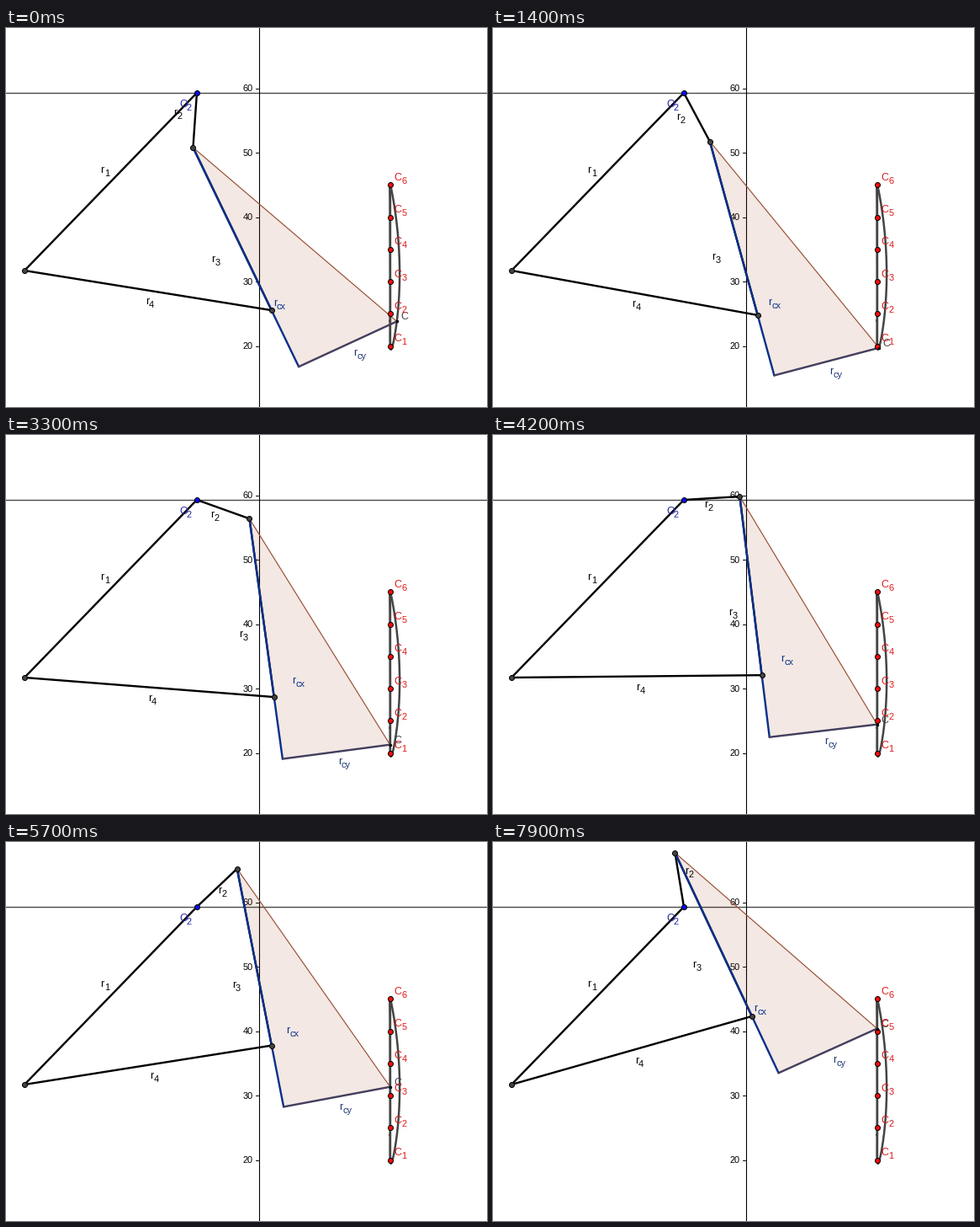
Write a matplotlib script that moves like this. It is 572 px wide and 450 px high and loops after 8 s.

```python
import numpy as np
import matplotlib.pyplot as plt
from matplotlib.animation import FuncAnimation

W, H, DPI = 572, 450, 72          # at 72 dpi one point is one pixel
FRAMES, STEP = 80, 100
SX, SY = 7.83, 7.65               # pixels per unit
NAVY, DARK, RED = "#08308c", "#444444", "#e01818"

# linkage in graph units, points as complex numbers
O2, O4 = -9.39 + 59.28j, -35.57 + 31.70j
R2, R3, R4, RCX, RCY = 8.5, 27.93, 38.02, 37.62, 16.47

# crank angle in degrees against time in ms
TIMES = [0, 1400, 3300, 4200, 5700, 6700, 7900]
ANGLES = [-93.9, -62.4, -20.1, 3.5, 44.1, 68.0, 99.1]

plt.rcParams["font.family"] = "Liberation Sans"


def px(z):
    return np.array([300.5 + SX * np.real(z), 71.5 + SY * (60 - np.imag(z))])


def linkage(deg):
    """Joints A, B, corner D and tracing point C for a crank angle."""
    a = O2 + R2 * np.exp(1j * np.radians(deg))
    v = O4 - a
    d = abs(v)
    along = (d**2 + R3**2 - R4**2) / (2 * d)
    u = (along + 1j * np.sqrt(R3**2 - along**2)) * v / d / R3
    corner = a + RCX * u
    return a, a + R3 * u, corner, corner + RCY * 1j * u


fig = plt.figure(figsize=(W / DPI, H / DPI), dpi=DPI, facecolor="white")
ax = fig.add_axes([0, 0, 1, 1])
ax.set_xlim(0, W)
ax.set_ylim(H, 0)
ax.axis("off")


def line(color, lw, z, *pts):
    art, = ax.plot([], [], color=color, lw=lw, zorder=z,
                   solid_capstyle="round", solid_joinstyle="round")
    if pts:
        art.set_data(*np.transpose(pts))
    return art


def dot(color, size=6, p=(0, 0)):
    art, = ax.plot([p[0]], [p[1]], "o", ms=size, mfc=color, mec="black",
                   mew=1, zorder=8)
    return art


class Label:
    """Letter with an optional subscript, placed by its left baseline."""
    ADVANCE = {"r": 4.2, "C": 8.7, "O": 8.6}

    def __init__(self, main, sub, color, pos=(0, 0), z=9):
        style = dict(color=color, va="baseline", ha="left", zorder=z)
        self.main = ax.text(0, 0, main, size=12.5, **style)
        self.sub = ax.text(0, 0, sub, size=11, **style)
        self.shift = self.ADVANCE[main]
        self.move(pos)

    def move(self, pos):
        x, y = pos
        self.main.set_position((x, y))
        self.sub.set_position((x + self.shift, y + 4))


def beside(p, q, offset):
    """Label spot: midpoint plus 16 px along the normal plus an offset."""
    dx, dy = (q - p) / np.hypot(*(q - p))
    return (p + q) / 2 + 16 * np.array([-dy, dx]) + offset


# axes
line("#4a4a4a", 1.4, 1, (-5, 77), (W + 5, 77))
line("black", 1.1, 1, (300.5, -5), (300.5, H + 5))
for v in range(20, 61, 10):
    y = px(v * 1j)[1]
    line("black", 1, 1, (297, y), (300, y))
    ax.text(294, y + 3.8, str(v), size=11, ha="right", va="baseline", zorder=1)

# path of C and the precision points
ax.plot(*px(linkage(np.linspace(0, 360, 361))[3]), color=DARK, lw=2.5, zorder=6)
line(DARK, 2.4, 6, px(20 + 20j), px(20 + 45j))
for i in range(6):
    p = px(20 + (20 + 5 * i) * 1j)
    dot("#ff0a0a", p=p)
    Label("C", str(i + 1), RED, p + (4.7, -5.5))

# fixed link
P2, P4 = px(O2), px(O4)
line("black", 2.4, 4, P2, P4)
dot("#0a0af0", p=P2)
dot(DARK, p=P4)
Label("O", "2", "#2424a8", (206, 94))
Label("r", "1", "black", (112.5, 171.5))

# moving parts
plate, = ax.fill([0, 0, 0], [0, 0, 0], color="#993300", alpha=0.11, lw=0, zorder=2)
edge = line("#9a5238", 1.2, 3)
crank, rocker, coupler = (line("black", 2.4, 4) for _ in range(3))
arm_x = line(NAVY, 2.4, 5)
arm_y = line("#443e5e", 2.4, 5)
dot_a, dot_b, dot_c = dot(DARK), dot(DARK), dot("#222222", 2.5)
tags = [Label("r", s, c) for s, c in
        [("2", "black"), ("3", "black"), ("4", "black"), ("cx", NAVY), ("cy", "#1c3474")]]
tag_c = Label("C", "", DARK, z=7)


def draw(i):
    a, b, d, c = (px(z) for z in linkage(np.interp(i * STEP, TIMES, ANGLES)))
    plate.set_xy([a, d, c])
    for art, p, q in [(edge, a, c), (crank, P2, a), (rocker, P4, b),
                      (coupler, a, b), (arm_x, a, d), (arm_y, d, c)]:
        art.set_data(*np.transpose([p, q]))
    for art, p in [(dot_a, a), (dot_b, b), (dot_c, c)]:
        art.set_data([p[0]], [p[1]])
    spots = [(P2, a, (-9.7, -4.8)), (a, b, (-10.7, 32.8)), (P4, b, (-0.4, 0.5)),
             (a, d, (46.8, 51)), (d, c, (-0.2, -0.5))]
    for tag, spot in zip(tags, spots):
        tag.move(beside(*spot))
    tag_c.move(c + (4.7, -2))
    return []


anim = FuncAnimation(fig, draw, frames=FRAMES, interval=STEP,
                     repeat=True, repeat_delay=0, blit=False)
plt.show()
```
